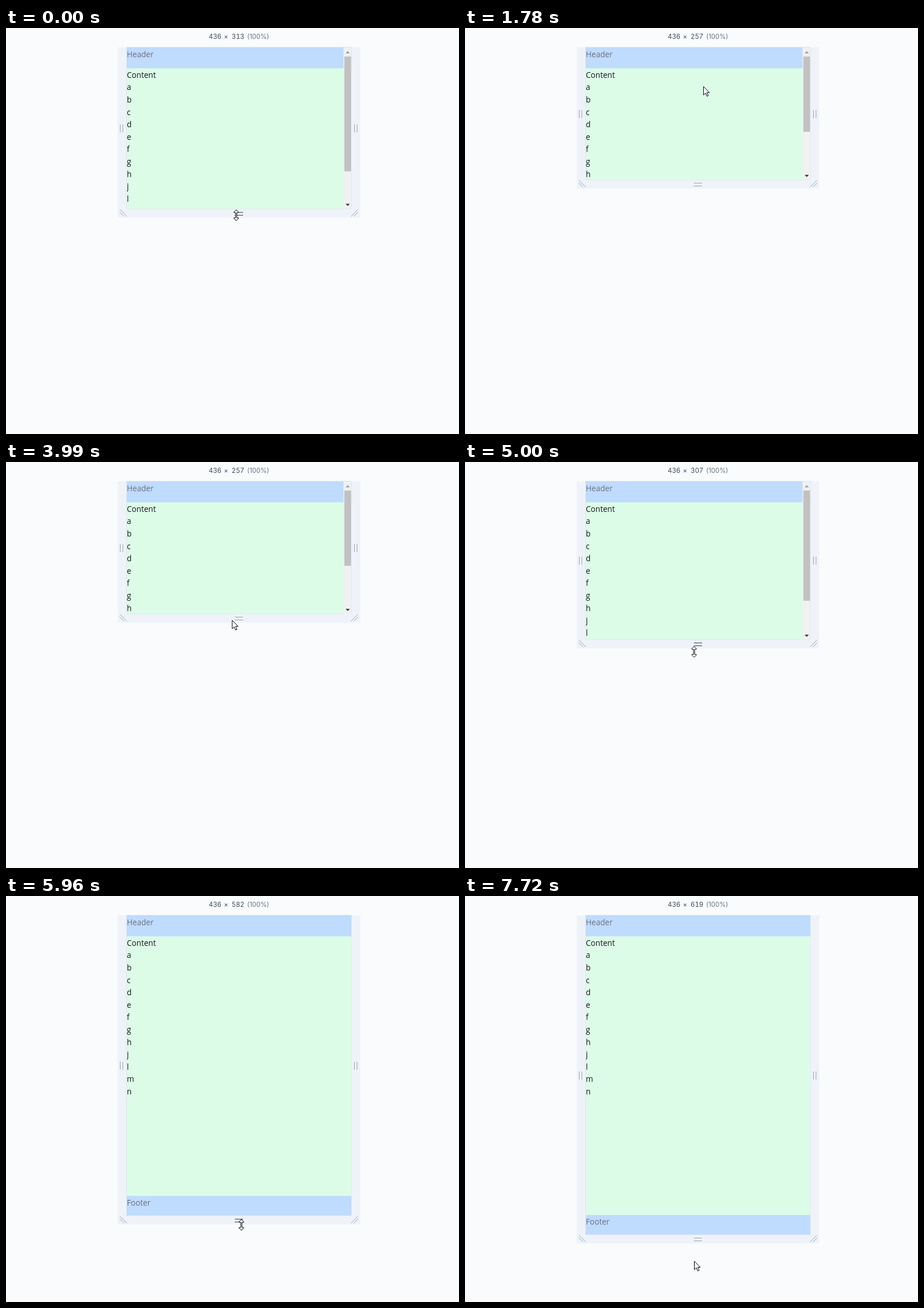
Animation of 791 by 708 pixels, one loop 8 s. Source, as an HTML page:

```html
<!DOCTYPE html>
<html lang="en">
<head>
<meta charset="utf-8">
<style>
  html, body { margin: 0; width: 100%; height: 100%; overflow: hidden; background: #f9fbfd; }
  svg { display: block; }
  .copy { font: 13.6px "Open Sans", "Noto Sans", sans-serif; fill: #15181c; }
  .muted { fill: #6b7280; }
  .label { font: 11.4px Inter, sans-serif; fill: #3f4b5e; }
  .tabular { font-variant-numeric: tabular-nums; }
  .grip { fill: none; stroke: #94a3b8; }
  .grip.active { stroke: #334155; }
  .cursor { fill: #fff; stroke: #000; }
</style>
</head>
<body>
<svg width="791" height="708" viewBox="0 0 791 708">
  <g class="label">
    <text class="tabular" x="354" y="19">436</text>
    <text x="380.5" y="19">×</text>
    <text class="tabular" id="size" x="394" y="19"></text>
    <text x="421" y="19" fill="#64748b">(100%)</text>
  </g>
  <rect id="frame" x="195" y="33.5" width="423.7" fill="#eff3f9"/>
  <rect id="border" x="210.5" y="33.5" width="392.5" fill="#f9fbfd" stroke="#dce3ee"/>
  <svg id="view" x="211" y="34" width="392" class="copy">
    <g id="page">
      <rect id="content" y="36" width="392" fill="#dcfce7"/>
      <rect width="392" height="36.3" fill="#bfdbfe"/>
      <text class="muted" y="16.8">Header</text>
      <g id="lines"></g>
      <g id="footer">
        <rect width="392" height="36" fill="#bfdbfe"/>
        <text class="muted" y="16.6">Footer</text>
      </g>
    </g>
  </svg>
  <g id="scrollbar">
    <rect id="track" x="589.3" y="34" width="13.5" fill="#f1f1f1"/>
    <rect id="thumb" x="590.8" width="11.7" fill="#c1c1c1"/>
    <path id="up" d="M593 44.2h7.4l-3.7-4z"/>
    <path id="down" d="M593 -8.8h7.4l-3.7 4z"/>
  </g>
  <path id="sides" class="grip" d="M199.5 -7v14m4.5 -14v14M608.5 -7v14m4.5 -14v14"/>
  <path id="corners" class="grip" d="M211 13.5l-12-12m7 12l-7.5-7.5M602.5 13.5l12-12m-7 12l7.5-7.5"/>
  <path id="bottom" class="grip" d="M399.5 0h14.5m-14.5 5h14.5"/>
  <path id="cursor" class="cursor"/>
</svg>
<script>
const LOOP = 8000, TICK = 138.9;
const SCALE = 0.9, TOP = 33.5, PAGE = 392, MAX_SCROLL = 121.5;
const ARROW = "M.5 .5V15.2L4 12L6.4 17.6L8.8 16.5L6.4 11.2H10.8Z";
const RESIZE = "M0 -9.5L4 -5.5V-4.5H1V4.5H4V5.5L0 9.5L-4 5.5V4.5H-1V-4.5H-4V-5.5Z";

// Key points: [tick, ...values]
const height = [[0, 313], [5, 257], [32, 257], [34, 268], [36, 307], [40, 526], [43, 582], [47, 619]];
const pointer = [
  [0, 402, 326.5], [5, 401, 276], [7, 419, 83], [8, 416, 101.5],
  [25, 416, 101.5], [28, 390, 276], [30, 399, 275], [33, 399, 278],
  [36, 400, 331], [40, 408, 526], [43, 411, 573.5], [47, 403, 603],
  [53, 403, 603], [56, 398.5, 653],
];

const $ = id => document.getElementById(id);
const set = (id, attrs) => {
  for (const name in attrs) $(id).setAttribute(name, attrs[name]);
};
const shift = y => `translate(0 ${y})`;
const clamp = u => Math.min(1, Math.max(0, u));

function along(keys, tick) {
  const i = keys.findLastIndex(key => key[0] <= tick);
  const [start, ...from] = keys[i], [stop, ...to] = keys[i + 1] || [start + 1, ...from];
  return from.map((v, k) => v + (to[k] - v) * (tick - start) / (stop - start));
}

// Eased progress of one turn of the mouse wheel
function turn(tick, start) {
  const u = clamp((tick - start) / 1.9);
  return u * u * (3 - 2 * u);
}

$("lines").innerHTML = ["Content", ..."abcdefghjlmn"]
  .map((line, i) => `<text y="${52.8 + i * 21.6}">${line}</text>`).join("");

function draw(ms) {
  const tick = Math.floor(ms / TICK + 0.35);
  const h = Math.round(along(height, tick)[0]), [x, y] = along(pointer, tick);
  const resizing = tick <= 5 || (tick >= 30 && tick < 54);
  const scroll = MAX_SCROLL *
    (turn(tick, 6.64) - turn(tick, 11.1) + turn(tick, 16.1) - turn(tick, 21.1));
  const boxHeight = h * SCALE, end = TOP + boxHeight;
  const pageHeight = Math.max(h, PAGE) * SCALE;
  const trackLength = boxHeight - 31;

  $("size").textContent = h;
  set("frame", { height: boxHeight + 15.5 });
  set("border", { height: boxHeight });
  set("view", { height: boxHeight - 0.7 });
  set("page", { transform: shift(-scroll) });
  set("content", { height: pageHeight - 36 });
  set("footer", { transform: shift(pageHeight - 34.8) });

  set("scrollbar", { visibility: h < PAGE ? "visible" : "hidden" });
  set("track", { height: boxHeight - 0.7 });
  set("thumb", { y: 49.7 + scroll * trackLength / pageHeight, height: trackLength * h / PAGE });
  set("up", { fill: scroll > 0.5 ? "#404040" : "#a0a0a0" });
  set("down", { fill: scroll < 121 ? "#404040" : "#a0a0a0", transform: shift(end) });

  set("sides", { transform: shift(Math.round(end - boxHeight / 2 + 0.5)) });
  set("corners", { transform: shift(Math.floor(end)) });
  set("bottom", {
    transform: shift(Math.floor(end + 6) + 0.5),
    class: resizing ? "grip active" : "grip",
  });
  set("cursor", { d: resizing ? RESIZE : ARROW, transform: `translate(${x} ${y})` });
}

function run() {
  draw(performance.now() % LOOP);
  requestAnimationFrame(run);
}
run();
</script>
</body>
</html>
```
